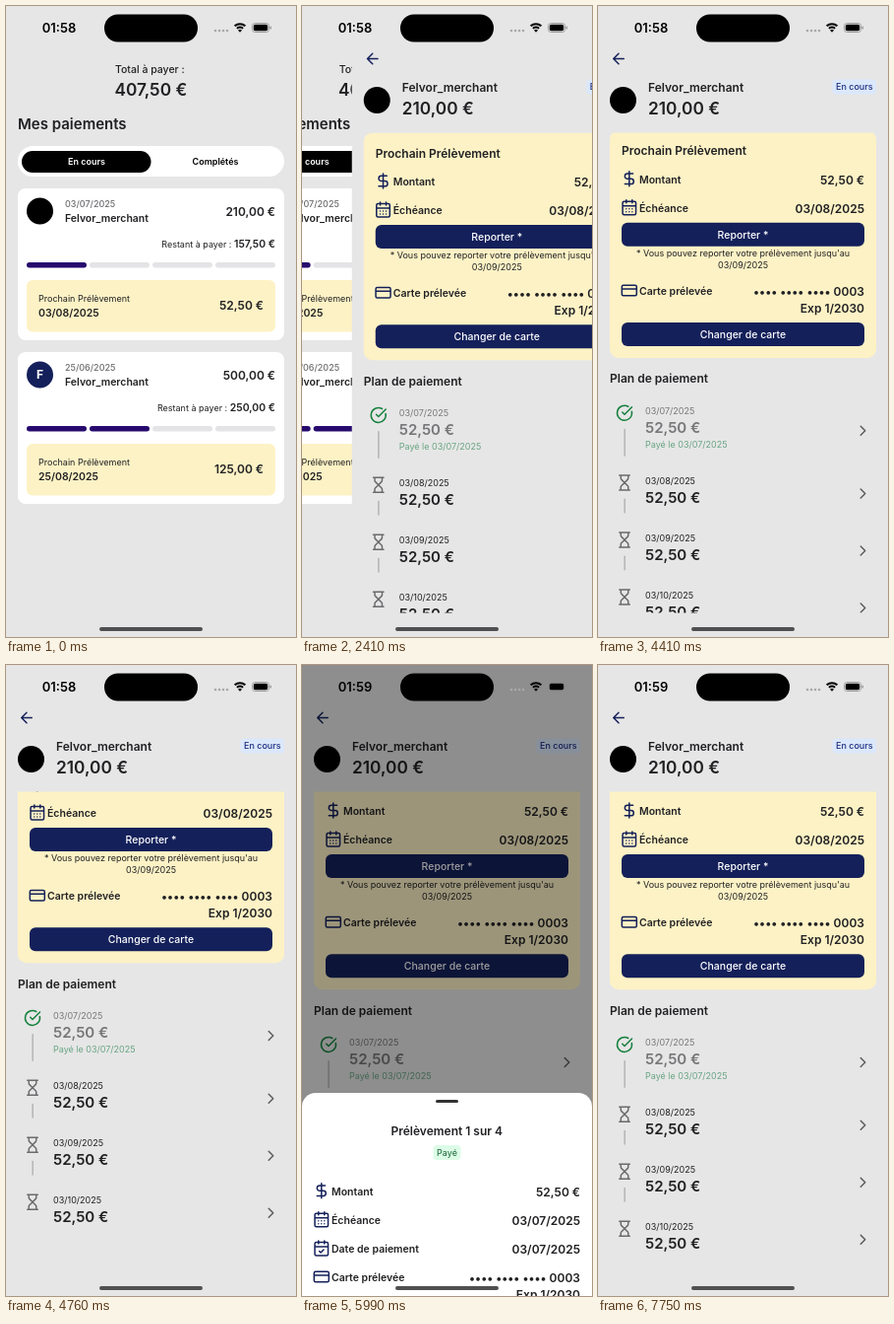
These frames come from a looping animation (295x640 px, 8 s). An HTML page:

```html
<!DOCTYPE html>
<html lang="fr">
<head>
<meta charset="utf-8">
<title>Mes paiements</title>
<style>
  html, body { margin: 0; width: 100%; height: 100%; overflow: hidden; background: #e6e6e6; }
  svg { display: block; width: 100%; height: 100%; font-family: Inter, "Liberation Sans", sans-serif; }
  .icon { fill: none; stroke-width: 2; stroke-linecap: round; stroke-linejoin: round; }
</style>
</head>
<body>
<svg id="stage" viewBox="0 0 295 640"></svg>
<script>
const LOOP = 8000;
const BG = '#e6e6e6', INK = '#212124', GREY = '#77777a', NAVY = '#14205a', GREEN = '#15803d',
      YELLOW = '#fdf2c5', PURPLE = '#270a6e', TRACK = '#e4e4e7';
const SHOP = 'Felvor_merchant';

const CALENDAR = 'M8 2v4M16 2v4M3 10h18M5 4h14a2 2 0 0 1 2 2v14a2 2 0 0 1-2 2H5a2 2 0 0 1-2-2V6a2 2 0 0 1 2-2z';
const ICONS = {
  back: 'M19 12H5M12 19l-7-7 7-7',
  next: 'M9 18l6-6-6-6',
  dollar: 'M12 2v20M17 5H9.5a3.5 3.5 0 0 0 0 7h5a3.5 3.5 0 0 1 0 7H6',
  days: CALENDAR + 'M8 14h.01M12 14h.01M16 14h.01M8 18h.01M12 18h.01M16 18h.01',
  dayDone: CALENDAR + 'M9 16l2 2 4-4',
  card: 'M4 5h16a2 2 0 0 1 2 2v10a2 2 0 0 1-2 2H4a2 2 0 0 1-2-2V7a2 2 0 0 1 2-2zM2 10h20',
  done: 'M21.8 10A10 10 0 1 1 17 3.335M9 11l3 3L22 4',
  wait: 'M5 22h14M5 2h14M17 22v-4.17a2 2 0 0 0-.59-1.42L12 12l-4.41 4.41A2 2 0 0 0 7 17.83V22' +
        'M7 2v4.17a2 2 0 0 0 .59 1.42L12 12l4.41-4.41A2 2 0 0 0 17 6.17V2'
};

// Text is placed by the vertical centre of its capitals.
const text = (x, y, size, weight, str, fill = INK, anchor = 'start', attrs = '') =>
  `<text x="${x}" y="${y + size * 0.364}" font-size="${size}" font-weight="${weight}" fill="${fill}" text-anchor="${anchor}" ${attrs}>${str}</text>`;
const mid = (x, y, size, weight, str, fill, attrs) => text(x, y, size, weight, str, fill, 'middle', attrs);
const end = (x, y, size, weight, str, fill) => text(x, y, size, weight, str, fill, 'end');
const box = (x, y, w, h, r, fill, attrs = '') =>
  `<rect x="${x}" y="${y}" width="${w}" height="${h}" rx="${r}" fill="${fill}" ${attrs}/>`;
const disc = (x, y, r, fill) => `<circle cx="${x}" cy="${y}" r="${r}" fill="${fill}"/>`;
const icon = (x, y, name, color = NAVY) =>
  `<path class="icon" stroke="${color}" transform="translate(${x - 9} ${y - 9}) scale(.75)" d="${ICONS[name]}"/>`;

const payment = (y, color, letter, date, total, left, paid, nextDate, next) =>
  box(12, y, 271, 154, 8, '#fff') +
  disc(34.5, y + 23, 13.5, color) + mid(34.5, y + 23, 12, 700, letter, '#fff') +
  text(60, y + 16, 9, 500, date, '#6d6d70') +
  text(60, y + 30, 10.5, 600, SHOP) +
  end(274, y + 24, 12, 600, total) +
  end(274, y + 56.5, 9, 400, `Restant à payer : <tspan font-size="10.5" font-weight="600">${left}</tspan>`) +
  [0, 1, 2, 3].map(i => box(21 + i * 64, y + 75, 61, 5.5, 2.75, i < paid ? PURPLE : TRACK)).join('') +
  box(21, y + 93, 253, 52.5, 6, YELLOW) +
  text(33, y + 111.5, 9, 400, 'Prochain Prélèvement') +
  text(33, y + 125.7, 10.5, 600, nextDate) +
  end(262, y + 119, 12, 600, next);

const row = (x, right, y, name, label, value) =>
  icon(x + 7.8, y - 0.5, name) + text(x + 18, y, 10.5, 600, label) + end(right, y + 0.7, 12, 600, value);
const cardRow = (x, right, y) =>
  row(x, right, y, 'card', 'Carte prélevée', '•••• •••• •••• 0003') + end(right, y + 17.8, 12, 600, 'Exp 1/2030');
const button = (y, label) =>
  box(24, y, 247, 24, 6, NAVY) + mid(147.5, y + 12, 10.5, 500, label, '#fff');

const instalment = (y, date, paid, line) =>
  icon(27, y + 2, paid ? 'done' : 'wait', paid ? GREEN : '#6b6b6e') +
  (line ? box(26.4, y + 18, 1.5, line, 0.7, '#b4b4b6') : '') +
  text(48, y, 9, 400, date, paid ? GREY : INK) +
  text(48, y + 17, 15, 600, '52,50 €', paid ? GREY : INK) +
  (paid ? text(48, y + 34, 9, 400, 'Payé le ' + date, '#68a583') : '') +
  icon(269.5, y + (paid ? 20 : 13), 'next', '#5c5c60');

const listPage =
  box(0, 0, 295, 640, 0, BG) +
  mid(146.3, 64.3, 10.5, 500, 'Total à payer :') +
  mid(147.3, 85, 17.3, 600, '407,50 €') +
  text(12, 120, 15, 600, 'Mes paiements') +
  box(12, 142, 271, 31, 15.5, '#fff') +
  box(0, 147, 131.5, 22, 11, '#000', 'id="pill"') +
  mid(82, 158, 9, 600, 'En cours', '#fff', 'id="tabA"') +
  mid(213, 158, 9, 600, 'Complétés', '#000', 'id="tabB"') +
  '<g id="cards">' +
  payment(185, '#000', '', '03/07/2025', '210,00 €', '157,50 €', 1, '03/08/2025', '52,50 €') +
  payment(351, NAVY, 'F', '25/06/2025', '500,00 €', '250,00 €', 2, '25/08/2025', '125,00 €') +
  '</g>';

const detailPage =
  box(0, 0, 295, 640, 0, BG) +
  icon(21, 53.5, 'back') +
  disc(25.5, 95.5, 13.5, '#000') +
  text(51, 83, 12, 600, SHOP) +
  text(51, 104, 17.3, 600, '210,00 €') +
  box(238.5, 74.5, 44.5, 15, 4, '#dbe7fb') + mid(260.8, 82, 9, 500, 'En cours', '#1e2f80') +
  '<g clip-path="url(#view)"><g id="scroll">' +
  box(12, 128.7, 271, 230.5, 9, YELLOW) +
  text(24, 149.3, 12, 600, 'Prochain Prélèvement') +
  row(24, 271, 178, 'dollar', 'Montant', '52,50 €') +
  row(24, 271, 207, 'days', 'Échéance', '03/08/2025') +
  button(222, 'Reporter *') +
  mid(147.5, 252.7, 9, 400, '* Vous pouvez reporter votre prélèvement jusqu\'au') +
  mid(147.5, 265.2, 9, 400, '03/09/2025') +
  cardRow(24, 271, 291.3) +
  button(323.2, 'Changer de carte') +
  text(12, 380.3, 12, 600, 'Plan de paiement') +
  instalment(413, '03/07/2025', true, 28) +
  instalment(483.7, '03/08/2025', false, 15) +
  instalment(541.7, '03/09/2025', false, 15) +
  instalment(599.7, '03/10/2025', false, 0) +
  '</g></g>';

const sheet =
  box(0, 0, 295, 300, 14, '#fff') +
  box(136, 7, 23, 3, 1.5, '#333') +
  mid(147.3, 38.7, 12, 600, 'Prélèvement 1 sur 4') +
  box(133.5, 53, 28, 15, 4, '#dcfce7') + mid(147.5, 60.5, 9, 400, 'Payé', '#166534') +
  row(12, 283, 99.7, 'dollar', 'Montant', '52,50 €') +
  row(12, 283, 128.8, 'days', 'Échéance', '03/07/2025') +
  row(12, 283, 158, 'dayDone', 'Date de paiement', '03/07/2025') +
  cardRow(12, 283, 187);

const statusBar =
  mid(54, 22, 13, 600, '01:58', '#000', 'id="clock"') +
  box(100, 8.5, 95, 28, 14, '#000') +
  [0, 1, 2, 3].map(i => disc(213 + i * 4, 25, 1.3, '#a9a9ab')).join('') +
  '<path d="M232.6 20.3a8 8 0 0 1 10.8 0M234.9 22.8a4.6 4.6 0 0 1 6.2 0" fill="none" stroke="#000" stroke-width="2"/>' +
  '<path d="M236 24.6a3 3 0 0 1 4 0l-2 2.1z"/>' +
  box(250.5, 17.5, 17, 9, 2.8, 'none', 'stroke="#8c8c8e" stroke-width=".8"') +
  box(251.8, 18.8, 14.4, 6.4, 1.7, '#000') + box(268.6, 20.5, 1.2, 3, 0.6, '#8c8c8e') +
  box(95, 630, 105, 4, 2, '#505052');

const $ = id => document.getElementById(id);
$('stage').innerHTML =
  '<clipPath id="view"><rect y="128.5" width="295" height="487"/></clipPath>' +
  `<g id="list">${listPage}</g><g id="detail">${detailPage}</g>` +
  box(0, 0, 295, 640, 0, '#000', 'id="shade"') +
  `<g id="sheet">${sheet}</g>` + statusBar;

// Bursts of movement: start, end, number of visible steps.
const BURSTS = [[500, 730, 3], [1220, 1430, 3], [2180, 2820, 7], [4410, 5190, 8], [5650, 6290, 7], [7300, 7750, 5]];
function snap(t) {
  let now = 0;
  for (const [from, to, n] of BURSTS) {
    if (t < from) break;
    const step = (to - from) / (n - 1);
    now = Math.min(to, from + Math.floor((t - from) / step + 1e-6) * step);
  }
  return now;
}

const span = (t, start, length) => Math.max(0, Math.min(1, (t - start) / length));
const easeOut = u => 1 - (1 - u) ** 3;
const easeInOut = u => u < 0.5 ? 4 * u ** 3 : 1 - 4 * (1 - u) ** 3;
const spring = (t, start, rate) => {
  const x = Math.max(0, t - start) / 1000 * rate;
  return 1 - (1 + x) * Math.exp(-x);
};
const move = (id, x, y) => $(id).setAttribute('transform', `translate(${x.toFixed(2)} ${y.toFixed(2)})`);

function draw(time) {
  const t = snap(time);

  const completed = t >= 500 && t < 1220;
  const tab = easeOut(span(t, 450, 363)) - easeOut(span(t, 1170, 363));
  $('pill').setAttribute('x', 16 + 131.5 * tab);
  $('tabA').setAttribute('fill', completed ? '#000' : '#fff');
  $('tabB').setAttribute('fill', completed ? '#fff' : '#000');
  $('cards').style.display = completed ? 'none' : '';

  const push = t >= 4410 ? 1 : t < 2180 ? 0 : spring(t, 2120, 11.7);
  move('list', -88.5 * push, 0);
  move('detail', 296 * (1 - push), 0);

  const scroll = 57 * easeInOut(span(t, 4320, 420)) - 27 * easeOut(span(t, 4780, 410));
  move('scroll', 0, -scroll);

  const open = easeOut(span(t, 5600, 780)) - easeInOut(span(t, 7250, 500));
  move('sheet', 0, 640 - 241 * open);
  $('shade').setAttribute('opacity', 0.45 * open);
  $('clock').textContent = t < 5650 ? '01:58' : '01:59';
}

const begin = performance.now();
function tick() {
  draw((performance.now() - begin) % LOOP);
  requestAnimationFrame(tick);
}
tick();
</script>
</body>
</html>
```
